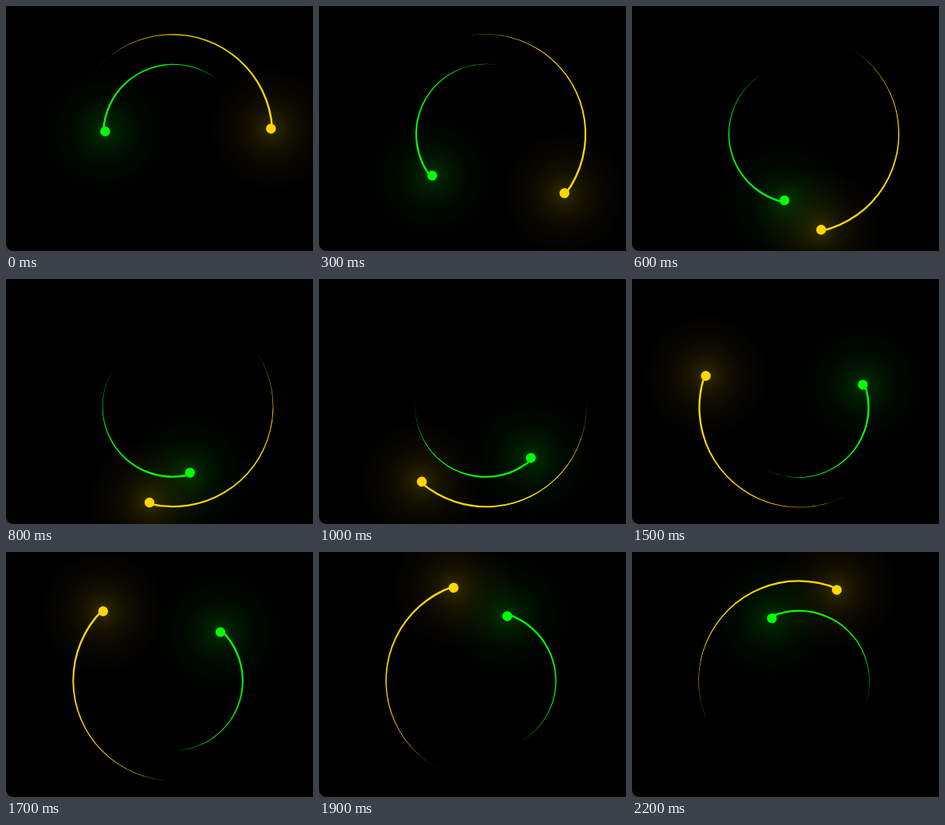
Write an HTML page with a canvas that moves like this. It is 385x308 px and loops after 2.3 s.

```html
<!DOCTYPE html>
<html>
<head>
<meta charset="utf-8">
<style>
html, body { margin: 0; width: 100%; height: 100%; overflow: hidden; background: #000; }
canvas { display: block; }
</style>
</head>
<body>
<canvas id="stage" width="385" height="308"></canvas>
<script>
const ctx = document.getElementById('stage').getContext('2d');
const LOOP = 2300, STEP = 100, RAD = Math.PI / 180;
const CX = 209.3, CY = 161.3, WIDTH = 2;

// Rotation in degrees at given steps; nearly uniform speed
const turn = [[0, -3.3], [3, 36.9], [6, 76.9], [10, 130.7], [15, 198.7], [19, 250.8], [22, 292.7]];

function angleAt(step) {
  let i = 1;
  while (turn[i][0] < step) i++;
  const [s0, a0] = turn[i - 1], [s1, a1] = turn[i];
  return a0 + (a1 - a0) * (step - s0) / (s1 - s0);
}

function comet(radius, dotRadius, rgb, angle, flip) {
  const paint = alpha => `rgba(${rgb},${alpha})`;
  const half = WIDTH / 2;
  ctx.save();
  ctx.translate(CX, CY);
  ctx.scale(flip, 1);
  ctx.rotate((angle - 45) * RAD);

  // Crescent between the ring and a slightly offset inner circle
  ctx.beginPath();
  ctx.arc(0, 0, radius, -90 * RAD, 45 * RAD);
  ctx.arc(-half, -half, radius - half, 45 * RAD, -90 * RAD, true);
  ctx.fillStyle = paint(1);
  ctx.fill();

  ctx.rotate(45 * RAD);
  ctx.translate(dotRadius, 0);
  const glow = ctx.createRadialGradient(0, 0, 5, 0, 0, 80);
  [[0, .18], [.12, .125], [.28, .08], [.55, .035], [1, 0]]
    .forEach(([at, alpha]) => glow.addColorStop(at, paint(alpha)));
  ctx.fillStyle = glow;
  ctx.fillRect(-80, -80, 160, 160);

  ctx.beginPath();
  ctx.arc(0, 0, 6.2, 0, 2 * Math.PI);
  ctx.fillStyle = paint(1);
  ctx.fill();
  ctx.restore();
}

function corner() {
  ctx.beginPath();
  ctx.moveTo(0, 299);
  ctx.arc(9, 299, 9, Math.PI, Math.PI / 2, true);
  ctx.lineTo(0, 308);
  ctx.fillStyle = '#3a3a3a';
  ctx.fill();
}

function draw(now) {
  const angle = angleAt(Math.floor(now % LOOP / STEP));
  ctx.fillStyle = '#000';
  ctx.fillRect(0, 0, 385, 308);
  comet(88.5, 85, '0,255,0', angle + .8, -1);
  comet(126, 123.2, '255,215,0', angle, 1);
  corner();
}

let start;
function tick(now) {
  start ??= now;
  draw(now - start);
  requestAnimationFrame(tick);
}
draw(0);
requestAnimationFrame(tick);
</script>
</body>
</html>
```
